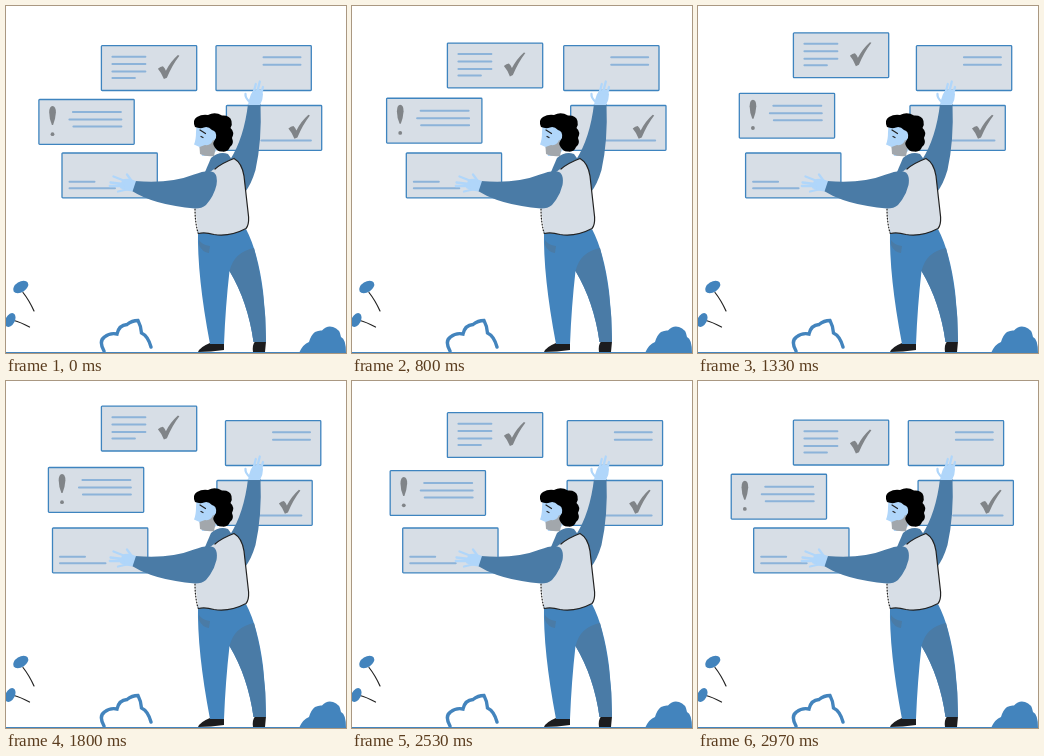
Animation, 340 px wide and 347 px high, one loop 3010 ms. Source, as an HTML page:

```html
<!DOCTYPE html>
<html lang="en">
<head>
<meta charset="utf-8">
<title>Arranging cards</title>
<style>
  html, body { margin: 0; width: 100%; height: 100%; overflow: hidden; background: #fff; }
  svg { display: block; }
  .card rect { width: 95.3px; height: 44.8px; rx: .8px; fill: #d7dee6; stroke: #3e84bf; stroke-width: 1.3; }
  .lines { fill: none; stroke: #8cb3d9; stroke-width: 2; stroke-linecap: round; }
  .mark { fill: #808488; }
  .blue { fill: #4384bd; }
  .dark { fill: #4a7ba6; }
  .skin { fill: #b0d6fa; }
  .fingers { fill: none; stroke: #b0d6fa; stroke-width: 2.3; stroke-linecap: round; }
  .ink { fill: none; stroke: #222; stroke-width: 1.2; stroke-linecap: round; }
</style>
</head>
<body>
<svg width="340" height="347" viewBox="0 0 340 347">
  <defs>
    <path id="tick" class="mark" d="M56.5 23Q59 20.500 61.500 20.500Q63.500 22 64.500 25Q69 16 76.500 9.300L78 10Q71 19 65.500 32L62.500 33.300Q60 27 56.500 23Z"/>
  </defs>

  <g id="cards">
    <g class="card"><rect/><path class="lines" d="M11 11H44M11 18.4H44M11 25.8H44M11 32.4H33.5"/><use href="#tick"/></g>
    <g class="card"><rect/><path class="lines" d="M47.5 11.6H84.5M47.5 19H84.5"/></g>
    <g class="card"><rect/><path class="lines" d="M34 12.4H82M30.5 19.9H82.5M34.5 27H82.5"/>
      <path class="mark" d="M13.6 6.5Q17 6.5 17 13Q16.500 20 14.200 25.500H13Q10.400 20 10.300 13Q10.400 6.500 13.600 6.500Z"/><circle class="mark" cx="13.6" cy="34.7" r="1.9"/></g>
    <g class="card"><rect/><path class="lines" d="M35 35H84.5"/><use href="#tick" x="5.5"/></g>
    <g class="card"><rect/><path class="lines" d="M7.500 28.800H32.500M7.500 35.200H53"/></g>
  </g>

  <!-- plants and ground -->
  <path class="ink" d="M17 286.500Q23 294 28 305M8 314.500Q14 316 23.500 321"/>
  <ellipse class="blue" cx="14.700" cy="281" rx="8.300" ry="5.200" transform="rotate(-32 14.700 281)"/>
  <ellipse class="blue" cx="4.200" cy="314" rx="4.600" ry="7.400" transform="rotate(28 4.200 314)"/>
  <path d="M98 345Q92.500 335 98.500 331Q104 326.500 111 328Q113 319 121 318.500Q126 314.500 132 314.500Q135 320 135.500 327Q142 330 145 341" fill="none" stroke="#4384bd" stroke-width="3.4" stroke-linecap="round"/>
  <path class="blue" d="M293 347Q297 338 303 336Q305 329 309 326Q313 324 316 324.500Q321 319 327 321Q334 323 335 331Q340 333 340 347Z"/>
  <path d="M0 346.500H340" stroke="#4384bd" stroke-width="1"/>

  <!-- legs -->
  <path d="M192 346Q194 341 204 337H218V344Q205 346 192 346ZM247 346Q246 339 249 335.500H260L259 346Z" fill="#1c1c1e"/>
  <path class="blue" d="M192 224Q216 232 240 223Q252 246 257 285Q260 310 260 336H247.500Q242 296 223.500 265Q219.500 300 218 338H204Q191 270 192 224Z"/>
  <path class="dark" d="M223.500 265Q228 246 248 242Q260 288 260 336H247.500Q242 296 223.500 265ZM193 234Q196 239 204 240L203 247Q196 246 193 239Z"/>

  <!-- raised arm -->
  <path class="dark" d="M242 98H254.500Q256 135 249.500 164Q245 179 239 186L224 154Q238 132 242 98Z"/>
  <path class="skin" d="M242 99Q243 93 245 88Q249 82 255 84L257 88Q257 94 254 99Z"/>
  <path class="fingers" d="M244 96Q239 92 239.500 88M247 89L249.800 78M251 87L253.800 75.500M255 88L257 81"/>

  <!-- torso -->
  <path class="dark" d="M199 166L205 152Q213 145 222 148L227 155L210 170Z"/>
  <path d="M204 166Q216 157 228 152.500Q236 157 238 170L242.600 211Q243 219 240 222.500Q224 231 208 228.500Q199 226 192.500 227.500L189 202Z" fill="#d7dee6"/>
  <path class="ink" d="M209 163Q216 157 228 152.500Q236 157 238 170L242.600 211Q243 219 240 222.500Q224 231 208 228.500Q199 226 192.500 227.500"/>
  <path class="ink" d="M189 203Q189 216 192 227" stroke-dasharray="1 2"/>

  <!-- reaching arm -->
  <path class="dark" d="M129 175Q164 178 188 168.500Q202 163 208 166.500Q212 170 210.500 179Q208 190 200 199Q196 202.500 189 202.500Q148 199 126 185Z"/>
  <path class="skin" d="M130 175L126.500 185.500Q119 185 114 182L116 174Q121 171 130 175Z"/>
  <path class="fingers" d="M125 174L121 168.500M119 175L107.500 170.500M117 178L104.500 176.500M117 180L103.800 180M123 183L112 185.500"/>

  <!-- head -->
  <path class="skin" d="M190.500 119H211V144L205 150H196L193.500 141L188 138.500Q190 134 190 126Z"/>
  <path d="M193.500 141L199 139Q205 140 207 134L211 136L208 150Q200 151 194 148Z" fill="#a2a7ac"/>
  <path d="M189 121Q186 114 191 111Q196 108 202 109Q209 105.500 216 109.500Q224 109 225.500 115Q226.500 119 224.500 122Q229 126 226 132Q228.500 138 224 141Q222 146.500 216 145.500Q211 146 208 140Q206 137 210 132Q211 125 206 124Q202 120 198 121.500Q194 123 189 121Z"/>
  <path class="ink" d="M194 124L199.500 127.500M195 130.500L197 131.500"/>
</svg>

<script>
  const LOOP = 3010;
  // start x, start y, travel x, travel y
  const places = [
    [95.4, 39.7, 0, -14.5],
    [210, 39.7, 9.5, 0],
    [32.9, 93.5, 9.5, -7],
    [220.4, 99.5, -9.5, 0],
    [56, 147, -9.5, 0]
  ];
  const cards = document.querySelectorAll('.card');

  const ease = (t, from, to) => {
    const u = Math.min(1, Math.max(0, (t - from) / (to - from)));
    return u < 0.5 ? 4 * u ** 3 : 1 - 4 * (1 - u) ** 3;
  };

  function draw(now) {
    const t = now % LOOP;
    const p = ease(t, 245, 1810) - ease(t, 1860, 3256);
    places.forEach(([x, y, dx, dy], i) =>
      cards[i].setAttribute('transform', `translate(${x + dx * p} ${y + dy * p})`));
    requestAnimationFrame(draw);
  }
  draw(0);
</script>
</body>
</html>
```
